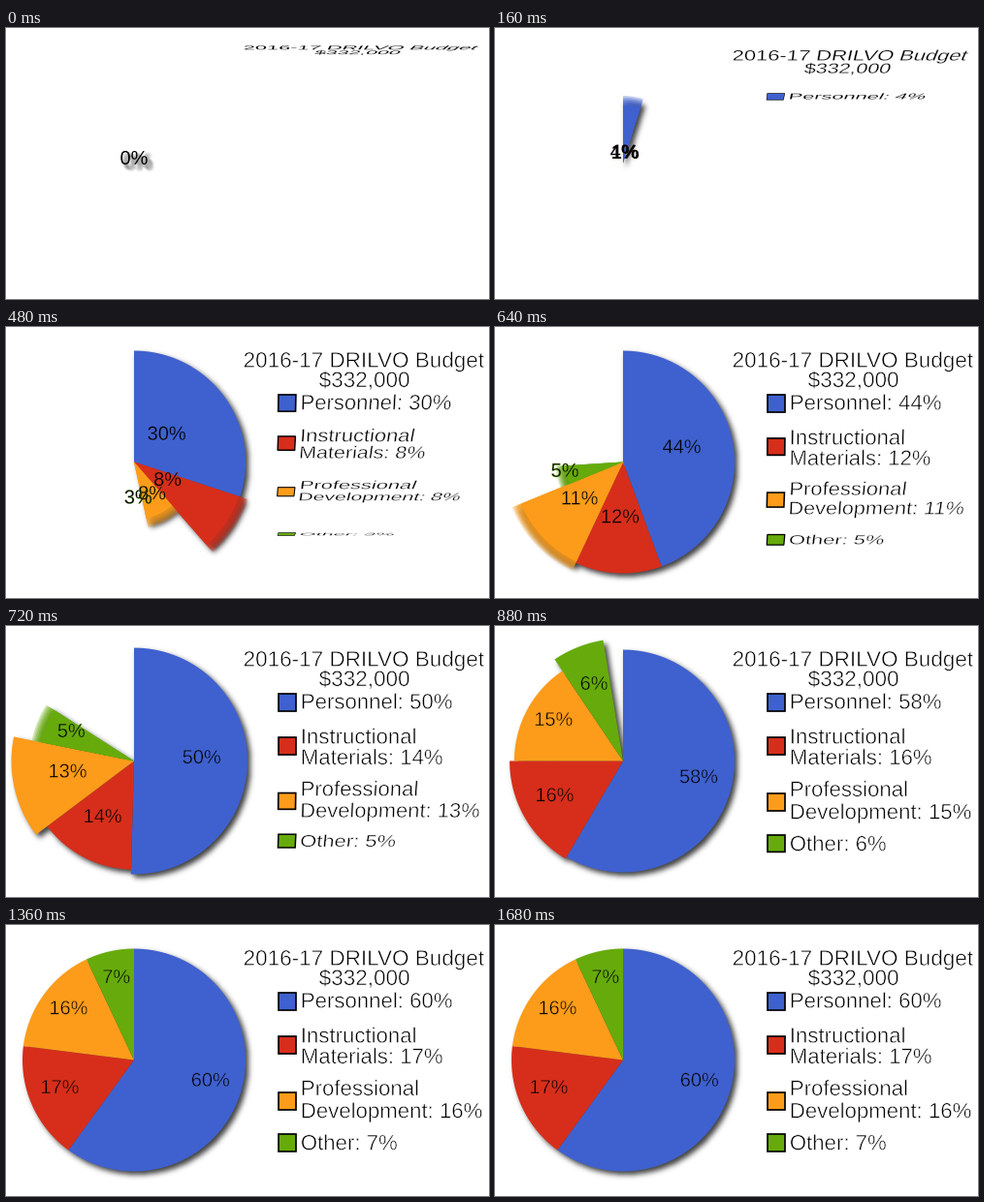
A matplotlib script that plays this animation: 498x280 px, repeating every 1760 ms.

```python
import numpy as np
import matplotlib.pyplot as plt
from matplotlib.animation import FuncAnimation
from matplotlib.patches import PathPatch, Polygon
from matplotlib.path import Path
from matplotlib.textpath import TextPath

W, H, DPI = 498, 280, 100
FRAMES, INTERVAL = 22, 80
PX = 72 / DPI
CX, CY, RADIUS = 132, 139.5, 115
FONT = dict(family="Liberation Sans")

SHARES = [60, 17, 16, 7]
COLORS = ["#3f61cf", "#d72e1b", "#fc9c1a", "#66ab0b"]

# Slice radius against its age in frames: grow, overshoot, settle.
AGES = range(11)
SPRING = [0, .25, .57, .9, 1.04, 1.1, 1.0, .975, 1.0, 1.017, 1.0]

# Legend rows: hinge y, delay in frames, swatch top, (baseline, text) lines.
ROWS = [
    (66, 1.15, 69, [(85.5, "Personnel: {}%")]),
    (102, 2.5, 114, [(121.5, "Instructional"), (143, "Materials: {}%")]),
    (157, 3.85, 172, [(176, "Professional"), (199.3, "Development: {}%")]),
    (212, 5.17, 215, [(232.3, "Other: {}%")]),
]
TITLE = [(41.7, "2016-17 DRILVO Budget"), (62, "$332,000")]
TITLE_HINGE, TITLE_MID = 15.5, 369.3
DEPTH = 625

fig = plt.figure(figsize=(W / DPI, H / DPI), dpi=DPI, facecolor="white")
ax = fig.add_axes([0, 0, 1, 1])
yy, xx = np.mgrid[0:H, 0:W] + 0.5


def glyphs(text, size, x, base, centered=False):
    path = TextPath((0, 0), text, size=size, prop=FONT)
    if centered:
        box = path.get_extents()
        x -= (box.x0 + box.x1) / 2
    return Path(path.vertices * [1, -1] + [x, base], path.codes)


def tilt(points, hinge, angle):
    """Swing points about a horizontal hinge, seen in perspective."""
    x, y = np.asarray(points, float).T
    drop = y - hinge
    zoom = DEPTH / (DEPTH + drop * np.cos(angle))
    px = W / 2 + (x - W / 2) * zoom
    py = H / 2 + (hinge + drop * np.sin(angle) - H / 2) * zoom
    return np.column_stack([px, py])


def flip_angle(k, delay):
    return np.radians(min(90, 4 + 14.5 * (k - delay)))


def flip_text(path, hinge, angle):
    path = Path(tilt(path.vertices, hinge, angle), path.codes)
    # A hair of white outline gives the light weight.
    ax.add_patch(PathPatch(path, fc="black", ec="white",
                           lw=0.6 * PX * np.sin(angle), zorder=5))


def wedge(a0, a1, r, color, alpha=1.0):
    a = np.linspace(a0, a1, 90)
    arc = np.column_stack([CX + r * np.sin(a), CY - r * np.cos(a)])
    ax.add_patch(Polygon(np.vstack([[CX, CY], arc]), fc=color, ec="none",
                         alpha=alpha, zorder=2))


def blur(img, sigma):
    t = np.arange(-12, 13)
    kernel = np.exp(-t**2 / (2 * sigma**2))
    kernel /= kernel.sum()
    for axis in (0, 1):
        img = np.apply_along_axis(np.convolve, axis, img, kernel, "same")
    return img


def pie_shadow(slices):
    dx, dy = xx - CX - 3.5, yy - CY - 3.5
    r = np.hypot(dx, dy)
    ang = np.arctan2(dx, -dy) % (2 * np.pi)
    mask = np.zeros((H, W))
    for a0, a1, radius in slices:
        mask[(ang >= a0) & (ang <= a1) & (r <= radius)] = 1
    rgba = np.zeros((H, W, 4))
    rgba[..., 3] = 0.75 * blur(mask, 2.8)
    ax.imshow(rgba, extent=(0, W, H, 0), aspect="auto", zorder=1)


def draw_pie(k, grown):
    edges = 2 * np.pi * grown * np.cumsum([0] + SHARES) / 100
    radii = [RADIUS * np.interp(k - 2 * i, AGES, SPRING) for i in range(4)]
    if k > 0:
        pie_shadow(list(zip(edges, edges[1:], radii)))
    for i, (r, color) in enumerate(zip(radii, COLORS)):
        if r <= 0:
            continue
        a0, a1 = edges[i], edges[i + 1]
        if k - 2 * i <= 4:
            # Fast slices have a soft rim.
            for j in range(6):
                wedge(a0, a1, max(r + 4 - 1.6 * j, 0.5), color, 0.28)
            r = max(r - 6, 0.5)
        wedge(a0, a1, r, color)


def draw_labels(grown, counts):
    reach = 83 * grown
    start = 0
    for i, (share, count) in enumerate(zip(SHARES, counts)):
        mid = 2 * np.pi * grown * (start + share / 2) / 100
        start += share
        if i and not count:
            continue
        x, y = CX + reach * np.sin(mid), 134 - reach * np.cos(mid)
        path = glyphs(f"{count}%", 20, x, y + 7, centered=True)
        ax.add_patch(PathPatch(path, fc="black", ec=COLORS[i],
                               lw=0.5 * PX * grown, zorder=4))
        if not count:
            for d in np.linspace(2.5, 6, 8):
                ghost = Path(path.vertices + [d, d], path.codes)
                ax.add_patch(PathPatch(ghost, fc="black", ec="black", lw=2.5,
                                       alpha=0.03, zorder=3))


def draw_title(k):
    angle = flip_angle(k, 0)
    for base, text in TITLE:
        path = glyphs(text, 22.5, TITLE_MID, base, centered=True)
        flip_text(path, TITLE_HINGE, angle)


def draw_legend(k, counts):
    for (hinge, delay, top, lines), color, n in zip(ROWS, COLORS, counts):
        angle = flip_angle(k, delay)
        if angle <= 0:
            continue
        left, right, low = 281, 299, top + 18.5
        box = [(left, top + 1), (right, top + 1), (right, low), (left, low)]
        ax.add_patch(Polygon(tilt(box, hinge, angle), fc=color, ec="black",
                             lw=(0.2 + 1.5 * np.sin(angle)) * PX,
                             joinstyle="miter", zorder=5))
        for base, text in lines:
            path = glyphs(text.format(n), 22.2, 303.8, base)
            flip_text(path, hinge, angle)


def draw(k):
    ax.cla()
    ax.axis("off")
    phase = np.radians(min(180, 4.5 + 14.27 * k))
    grown = (1 - np.cos(phase)) / 2
    counts = [int(share * grown) for share in SHARES]
    draw_pie(k, grown)
    draw_labels(grown, counts)
    draw_title(k)
    draw_legend(k, counts)
    ax.set_xlim(0, W)
    ax.set_ylim(H, 0)
    return []


anim = FuncAnimation(fig, draw, frames=FRAMES, interval=INTERVAL,
                     init_func=lambda: [], repeat=True, repeat_delay=0)
plt.show()
```
